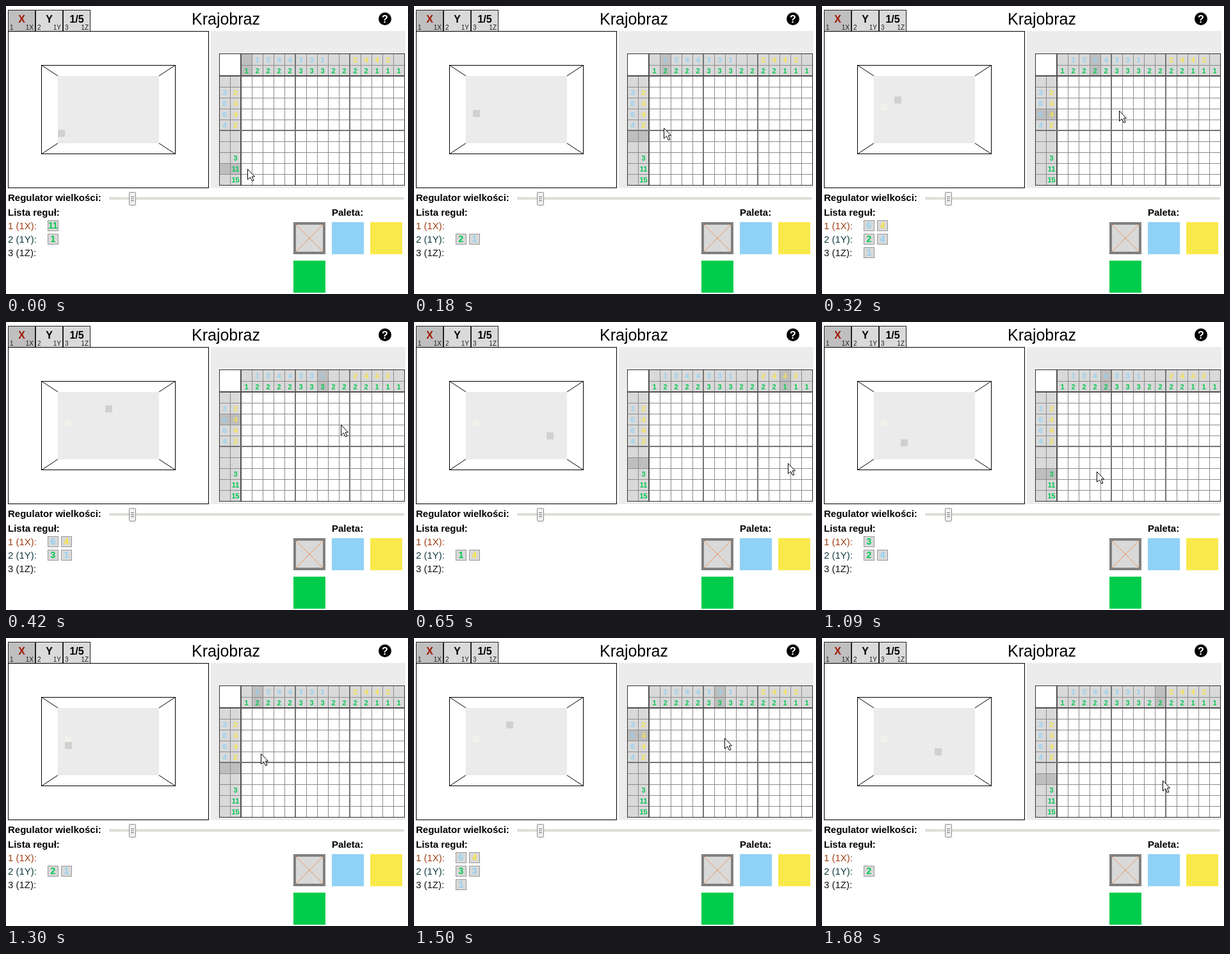
An HTML page with a canvas for the animation above (1.73 s loop, 628 by 449 pixels).

```html
<!DOCTYPE html>
<html lang="pl">
<head>
<meta charset="utf-8">
<title>Krajobraz</title>
<style>
html, body { margin: 0; width: 100%; height: 100%; overflow: hidden; background: #fff; }
canvas { display: block; }
</style>
</head>
<body>
<canvas id="stage" width="628" height="449"></canvas>
<script>
const ctx = document.getElementById('stage').getContext('2d');
const LOOP = 1730, STEP = 46.76, LAST = 36;
const CELL = 17, GX = 367, GY = 109;
const INK = { b: '#90d2f6', y: '#f8e446', g: '#00c850' };
const PICTURE = [
  '...............',
  '..bbb......yy..',
  '.bbbbbb...yyyy.',
  '..bbbbbb..yyyy.',
  '...bbbb....yy..',
  '...............',
  '...............',
  '.....ggg.......',
  '.ggggggggggg...',
  'ggggggggggggggg'
];
// Pointer route: step, x, y
const ROUTE = [
  [0, 377, 254], [3, 386, 206], [4, 390, 190], [5, 402, 180], [8, 495, 155],
  [9, 523, 160], [11, 565, 183], [13, 582, 213], [14, 584, 220], [16, 572, 245],
  [18, 530, 260], [20, 482, 257], [22, 443, 242], [23, 429, 233], [25, 403, 210],
  [27, 398, 180], [29, 428, 153], [31, 473, 152], [32, 485, 156], [34, 520, 190],
  [35, 530, 213], [36, 532, 222]
];
const POINTER = new Path2D('M0 0V16L4 12.5L7 18.5L9.5 17.5L6.7 11.5H11Z');

const runs = line => line.match(/b+|y+|g+/g) || [];
const rowHints = PICTURE.map(runs);
const colHints = [...PICTURE[0]].map((_, c) => runs(PICTURE.map(row => row[c]).join('')));

function rect(x, y, w, h, fill) {
  ctx.fillStyle = fill;
  ctx.fillRect(x, y, w, h);
}

function frame(x, y, w, h, stroke, fill) {
  rect(x, y, w, h, fill);
  ctx.lineWidth = 1;
  ctx.strokeStyle = stroke;
  ctx.strokeRect(x + 0.5, y + 0.5, w - 1, h - 1);
}

function line(x1, y1, x2, y2, stroke) {
  ctx.lineWidth = 1;
  ctx.strokeStyle = stroke;
  ctx.beginPath();
  ctx.moveTo(x1, y1);
  ctx.lineTo(x2, y2);
  ctx.stroke();
}

function text(str, x, y, font, fill = '#000', align = 'left') {
  ctx.font = font + ' "Liberation Sans", Arial, sans-serif';
  ctx.textAlign = align;
  ctx.fillStyle = fill;
  ctx.fillText(str, x, y);
}

function pointerAt(step) {
  const i = Math.max(1, ROUTE.findIndex(p => p[0] >= step));
  const [n0, x0, y0] = ROUTE[i - 1], [n1, x1, y1] = ROUTE[i];
  const k = (step - n0) / (n1 - n0);
  return [x0 + (x1 - x0) * k, y0 + (y1 - y0) * k];
}

function drawHeader() {
  [['X', '1X', '#a01800'], ['Y', '1Y', '#000'], ['1/5', '1Z', '#000']].forEach(([label, key, ink], i) => {
    const x = 3 + 43 * i;
    frame(x, 6, 43, 34, '#222', i ? '#dadada' : '#bfbfbf');
    text(label, x + 21.5, 26, 'bold 16px', ink, 'center');
    text(i + 1, x + 3, 37, '10px', '#222');
    text(key, x + 40, 37, '10px', '#222', 'right');
  });
  text('Krajobraz', 290, 29, '25px');
  ctx.fillStyle = '#000';
  ctx.beginPath();
  ctx.arc(592, 20, 10, 0, 7);
  ctx.fill();
  text('?', 592, 26, 'bold 16px', '#fff', 'center');
}

function drawRoom(col, row, step) {
  frame(3, 39, 314, 245, '#000', '#fff');
  frame(55, 92, 210, 139, '#000', '#fff');
  for (const [x, wx] of [[55, 81], [265, 239]])
    for (const [y, wy] of [[92, 109], [231, 214]]) line(x, y, wx, wy, '#000');
  rect(81, 109, 158, 105, '#ebebeb');
  if (step > 5) rect(92, 152, 10, 11, '#f1f1ec');
  rect(Math.round(81 + col * 10.53), Math.round(109 + row * 10.5), 11, 11, '#d0d0d0');
}

function hint(run, x, y) {
  text(run.length, x + 8.5, y + 13, 'bold 11px', INK[run[0]], 'center');
}

function drawPuzzle(col, row) {
  const left = GX - 2 * CELL, top = GY - 2 * CELL, right = GX + 15 * CELL, bottom = GY + 10 * CELL;
  rect(320, 39, 304, 245, '#ececec');
  rect(left, top, right - left, bottom - top, '#d9d9d9');
  rect(left, top, 34, 34, '#fff');
  rect(GX, GY, right - GX, bottom - GY, '#fff');
  rect(GX + col * CELL, top, CELL, 34, '#bebebe');
  rect(left, GY + row * CELL, 34, CELL, '#bebebe');
  for (let c = -1; c < 15; c++) {
    const x = GX + c * CELL + 0.5;
    line(x, c < 0 ? GY : top, x, bottom, '#8c8c8c');
  }
  for (let r = -1; r < 10; r++) {
    const y = GY + r * CELL + 0.5;
    line(r < 0 ? GX : left, y, right, y, '#8c8c8c');
  }
  for (const c of [0, 5, 10]) rect(GX + c * CELL - 1, top, 2, bottom - top, c ? '#757575' : '#505050');
  for (const r of [0, 5]) rect(left, GY + r * CELL - 1, right - left, 2, r ? '#757575' : '#505050');
  ctx.strokeStyle = '#333';
  ctx.strokeRect(left + 0.5, top - 0.5, right - left, bottom - top + 1);
  colHints.forEach((list, c) => [...list].reverse().forEach((run, i) =>
    hint(run, GX + c * CELL, GY - (i + 1) * CELL)));
  rowHints.forEach((list, r) => [...list].reverse().forEach((run, i) =>
    hint(run, GX - (i + 1) * CELL, GY + r * CELL)));
}

function drawSlider() {
  text('Regulator wielkości:', 3, 304, 'bold 15px');
  rect(161, 298, 461, 4, '#e1ddd9');
  ctx.beginPath();
  ctx.roundRect(192.5, 290.5, 10, 20, 1);
  ctx.fillStyle = '#f0f0f0';
  ctx.fill();
  ctx.strokeStyle = '#8c8c8c';
  ctx.stroke();
  for (const y of [297.5, 300.5, 303.5]) line(195, y, 200, y, '#777');
}

function drawRules(col, row) {
  text('Lista reguł:', 3, 327, 'bold 15px');
  const mark = PICTURE[row][col];
  const lists = [rowHints[row], [...colHints[col]].reverse(), mark === '.' ? [] : [mark]];
  lists.forEach((list, i) => {
    const y = 334 + 21 * i;
    text(`${i + 1} (1${'XYZ'[i]}):`, 3, y + 14, '15px', ['#a0401a', '#123c40', '#111'][i]);
    list.forEach((run, j) => {
      frame(65 + 21 * j, y, 17, 17, '#999', '#d9d9d9');
      text(run.length, 73.5 + 21 * j, y + 13, 'bold 14px', INK[run[0]], 'center');
    });
  });
}

function drawPalette() {
  text('Paleta:', 509, 327, 'bold 15px');
  rect(449, 337, 50, 50, '#808080');
  rect(453, 341, 42, 42, '#d9d9d9');
  line(453, 341, 495, 383, '#f09458');
  line(495, 341, 453, 383, '#f09458');
  rect(509, 337, 50, 50, '#90d2f6');
  rect(569, 337, 50, 50, '#f9e94b');
  rect(449, 397, 50, 50, '#00cc4c');
}

function drawPointer([x, y]) {
  ctx.save();
  ctx.translate(Math.round(x) + 0.5, Math.round(y) + 0.5);
  ctx.fillStyle = '#fff';
  ctx.fill(POINTER);
  ctx.strokeStyle = '#000';
  ctx.stroke(POINTER);
  ctx.restore();
}

function draw() {
  const t = performance.now() % LOOP;
  const step = Math.min(LAST, Math.floor((t + 8) / STEP));
  // The highlighted cell trails the pointer by one step
  const [hx, hy] = pointerAt(Math.max(0, step - 1));
  const col = Math.floor((hx - GX) / CELL), row = Math.floor((hy - GY) / CELL);
  rect(0, 0, 628, 449, '#fff');
  drawHeader();
  drawRoom(col, row, step);
  drawPuzzle(col, row);
  drawSlider();
  drawRules(col, row);
  drawPalette();
  drawPointer(pointerAt(step));
  requestAnimationFrame(draw);
}
draw();
</script>
</body>
</html>
```
